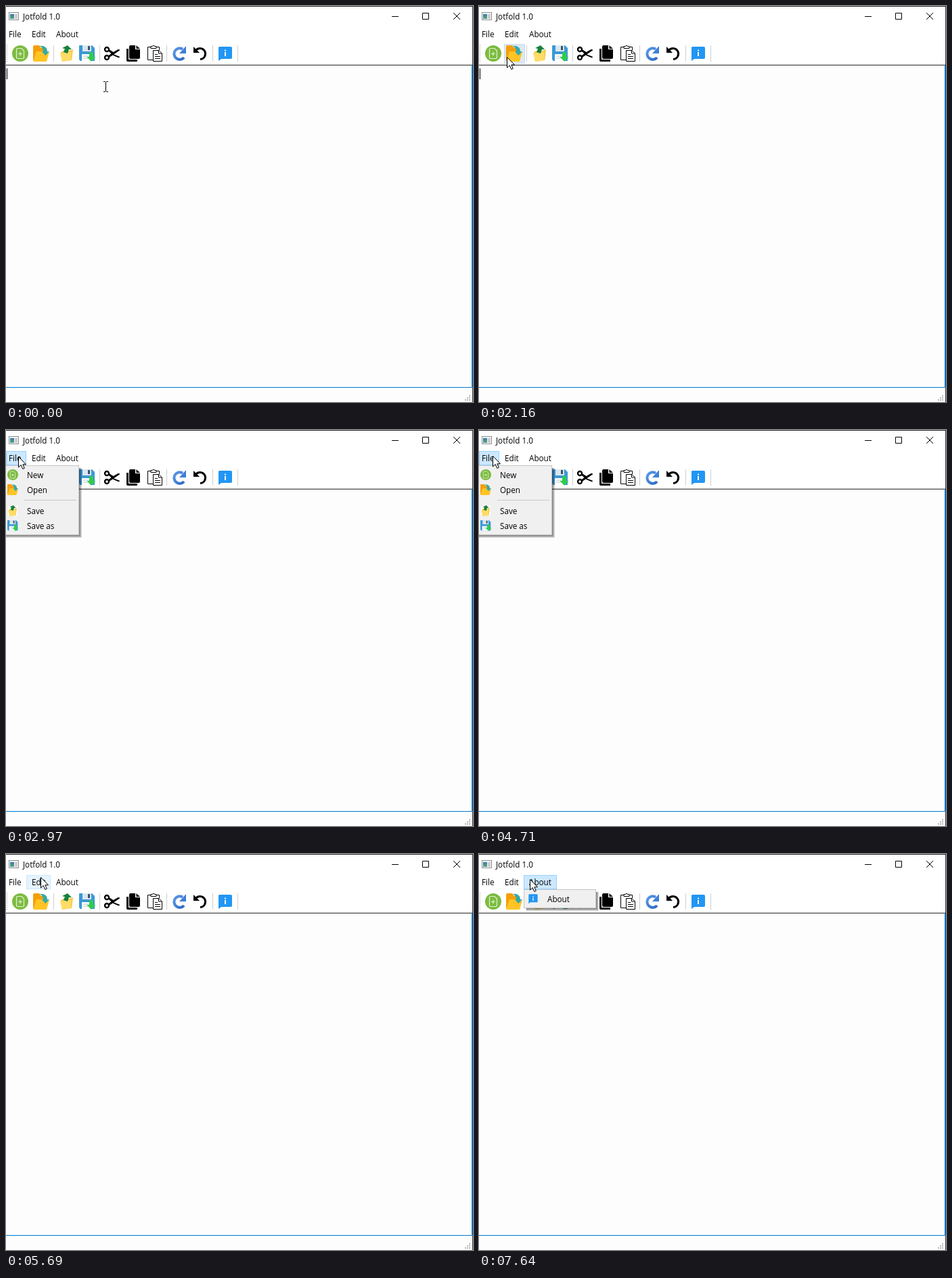
Recreate the animation shown at these times as an HTML page. Size 690 by 584 pixels, loop 8 s.

```html
<!DOCTYPE html>
<html lang="en">
<head>
<meta charset="utf-8">
<title>Text editor</title>
<style>
  html, body { margin: 0; width: 100%; height: 100%; overflow: hidden; background: #fff; }
  svg { display: block; }
  text { font: 11.7px "Open Sans", "Noto Sans", sans-serif; }
  .line { fill: none; stroke: #000; }
</style>
</head>
<body>
<svg id="stage" width="690" height="584" viewBox="0 0 690 584">
  <defs>
    <linearGradient id="pane" x2="0" y2="1"><stop stop-color="#3d78a8"/><stop offset="1" stop-color="#5aa886"/></linearGradient>
    <linearGradient id="blue" x2="1" y2="1"><stop stop-color="#5b9be8"/><stop offset="1" stop-color="#2b68c4"/></linearGradient>
    <symbol id="new" viewBox="0 0 24 24">
      <circle cx="12" cy="12" r="12" fill="#7cbb40"/>
      <path d="M8 4.5h6l3.5 3.5v10q0 1.5-1.5 1.5H8q-1.5 0-1.5-1.5V6Q6.500 4.500 8 4.500M12 9.500v6M9 12.500h6" fill="none" stroke="#e4f3d2" stroke-width="1.2"/>
    </symbol>
    <symbol id="open" viewBox="0 0 24 24">
      <path d="M0 2q0-2 2-2h7l3 4h8v18H0z" fill="#f59f0a"/>
      <path d="M10 1c6-1 11 2 11 8h3l-6 7-6-7h3c0-4-2-6-5-8z" fill="#35aaa6"/>
      <path d="M5 9h8l5 6 6-5-4 14H0z" fill="#ffc425"/>
    </symbol>
    <symbol id="save" viewBox="0 0 24 24">
      <path d="M3 10l5-2 2 2 11-4-2 16-14 2z" fill="#f2c53d"/>
      <path d="M2 12l17-3-1 13-13 2z" fill="#ffdc67"/>
      <path d="M13 0l6 6-4 0-2 6-6-2 2-5-4-1z" fill="#17803d"/>
    </symbol>
    <symbol id="saveAs" viewBox="0 0 24 24">
      <path d="M0 1q0-1 1-1h18l4 4v19H2l-2-2z" fill="#3c98d8"/>
      <path d="M5 0h13v9H5z" fill="#d9e6ee"/>
      <path d="M13 1h3v6h-3z" fill="#3a5368"/>
      <path d="M4 13h15v10H4z" fill="#fff"/>
      <path d="M6 16h9M6 19h7" stroke="#b9c8d0"/>
      <path d="M15 10h6v7h3.500l-6.500 7-6.500-7H15z" fill="#2fcc4b"/>
    </symbol>
    <symbol id="cut" viewBox="0 0 24 24">
      <g fill="none" stroke="#000" stroke-width="2.300"><circle cx="4.500" cy="6" r="3"/><circle cx="4.500" cy="18" r="3"/></g>
      <path d="M6 8l2-2 6 4 7-4q2-.5 3 1L8 18l-2-2 5-4zM14 13l10 4q-1 1.500-3 1l-9-4z"/>
    </symbol>
    <symbol id="copy" viewBox="0 0 24 24">
      <path d="M1 5h3v16h13v3H3q-2 0-2-2zM7 0h7v6h7v12q0 2-2 2H7q-2 0-2-2V2q0-2 2-2zM15.500 0L21 5h-5.500z"/>
    </symbol>
    <symbol id="paste" viewBox="0 0 24 24">
      <path class="line" d="M8 21.500H.5v-19H5M13 2.500h4.500V7M5 4.500v-3h2l2-1.200 2 1.200h2v3zM8.500 7.500H17l4.500 4.500v11.500h-13zM16.500 7.500V12H21M11 13.500h4M11 16.500h8M11 19.500h8"/>
    </symbol>
    <symbol id="redo" viewBox="0 0 24 24">
      <path d="M18 18A8.300 8.300 0 1 1 16 5.500" fill="none" stroke="url(#blue)" stroke-width="4"/>
      <path d="M21 1v11H11z" fill="#407fd8"/>
    </symbol>
    <symbol id="undo" viewBox="0 0 24 24">
      <path class="line" d="M4 8A8 8 0 1 1 11 20.500" stroke-width="3"/>
      <path d="M1 2v9h9z"/>
    </symbol>
    <symbol id="info" viewBox="0 0 24 24">
      <path d="M3 2h17q2 0 2 2v14q0 2-2 2H6l-4 3V4q0-2 1-2z" fill="#2196f3"/>
      <path d="M11 6.500h2v2h-2zM11 10h2v6h-2z" fill="#fff"/>
    </symbol>
  </defs>

  <rect width="690" height="584" fill="#fff"/>
  <rect y="88" width="690" height="496" fill="#fdfdfd"/>
  <rect y="86" width="690" height="1" fill="#b0b0b0"/>
  <rect y="87" width="690" height="1" fill="#646464"/>
  <rect width="690" height="1" fill="#2b2b2b"/>
  <rect x="689" width="1" height="584" fill="#333"/>
  <path d="M0 562.500H688.500V88" fill="none" stroke="#0078d7"/>
  <rect x="689" y="88" width="1" height="475" fill="#25659e"/>

  <rect x="4.500" y="9.500" width="14" height="11" fill="#f4f4f4" stroke="#8b9196"/>
  <rect x="6" y="12" width="6" height="7" fill="url(#pane)"/>
  <rect x="13" y="12" width="4" height="7" fill="#c9cdd0"/>
  <path class="line" d="M570 15.500h10M615.500 10.500h9v9h-9z"/>
  <path class="line" d="M661 10l10 10M671 10l-10 10"/>

  <rect id="hot"/>
  <text x="25" y="20">Jotfold 1.0</text>
  <text x="4" y="46">File</text>
  <text x="38" y="46">Edit</text>
  <text x="74" y="46">About</text>
  <path d="M1.500 57v27" stroke="#999" stroke-dasharray="1 2"/>
  <g id="bar"></g>
  <g id="menus"></g>
  <rect id="caret" x="1" y="92" width="1" height="16"/>
  <path id="beam" class="line" d="M-3.500-7.500h2.500l1 1 1-1h2.500M0-7V7M-3.500 7.500h2.500l1-1 1 1h2.500"/>
  <path id="arrow" d="M.5.500V16l3.700-3.500 2.600 6 2.500-1.200-2.500-5.500H11.500z" fill="#fff" stroke="#000"/>
</svg>
<script>
const LOOP = 8000;
const $ = id => document.getElementById(id);
const rect = (x, y, w, h, fill, more = "") =>
  `<rect x="${x}" y="${y}" width="${w}" height="${h}" fill="${fill}" ${more}/>`;
const icon = (id, x, y, size) =>
  `<use href="#${id}" x="${x}" y="${y}" width="${size}" height="${size}"/>`;

// Toolbar icons, separators and size grip
const tools = { new: 9, open: 40, save: 78, saveAs: 108, cut: 144.5, copy: 177,
  paste: 209, redo: 245, undo: 276, info: 312 };
let bar = "";
for (const id in tools) bar += icon(id, tools[id], 58, 24);
for (const x of [70, 138, 237, 305, 342]) bar += rect(x, 58, 1, 24, "#cfcfcf");
for (let row = 0; row < 3; row++)
  for (let col = 0; col <= row; col++)
    bar += rect(684 - 3 * col, 574 + 3 * row, 2, 2, "#b8b8b8");
$("bar").innerHTML = bar;

// Each menu: left edge, width, items as [label, icon, white backing]; null is a separator
const menus = [
  [-4, 112, [["New", "new"], ["Open", "open"], null, ["Save", "save", 1], ["Save as", "saveAs", 1]]],
  [30, 103, [["Cut", "cut"], ["Copy", "copy"], ["Paste", "paste"], null, ["Redo", "redo", 1], ["Undo", "undo", 1]]],
  [66, 107, [["About", "info"]]]
];
function menuMarkup([x, w, items]) {
  let y = 55, body = "", shadow = "";
  for (const item of items) {
    if (!item) {
      body += rect(x + 31, y + 4, w - 35, 1, "#c8c8c8");
      y += 9;
      continue;
    }
    const [label, id, backed] = item;
    if (backed) body += rect(x + 7, y + 4, 14, 14, "#fff");
    body += icon(id, x + 6, y + 3, 16) + `<text x="${x + 35}" y="${y + 16}">${label}</text>`;
    y += 22;
  }
  const h = y + 3 - 52;
  for (let i = 1; i < 5; i++) shadow += rect(x + 4, 56, w - 4 + i, h - 4 + i, "#000", 'opacity=".14"');
  return `<g>${shadow}${rect(x + .5, 52.5, w - 1, h - 1, "#f0f0f0", 'stroke="#c6c6c6"')}${body}</g>`;
}
$("menus").innerHTML = menus.map(menuMarkup).join("");

// Pointer moves: first step, last step, number of steps, x, y
const moves = [
  [500, 740, 4, 53, 119], [1550, 1730, 3, 47, 100],
  [2040, 2160, 3, 41, 75], [2220, 2580, 7, 18, 39],
  [4710, 4710, 1, 20, 38], [4770, 4890, 3, 51, 34],
  [7270, 7270, 1, 72, 36], [7580, 7640, 2, 75, 37]
];
// Open menus: index, open, close, fade time, fade steps
const opened = [[0, 2820, 4830, 150, 4], [1, 4830, 5190, 180, 4],
  [1, 5800, 7270, 160, 4], [2, 7270, LOOP, 60, 2]];
const caretOn = [[0, 500], [990, 1550], [2040, 2580], [5190, 5690]];
// Hover areas: x, y, width, height
const areas = [[0, 31, 30, 21], [30, 31, 36, 21], [66, 31, 49, 21], [6, 56, 31, 29], [37, 56, 31, 29]];

const stepAt = (t, start, span, n) =>
  n < 2 ? 0 : Math.min(n - 1, Math.floor((t - start) * (n - 1) / span + 1e-6));

function pointer(t) {
  let x = 147, y = 119;
  for (const [start, end, n, toX, toY] of moves) {
    if (t < start) break;
    const part = (stepAt(t, start, end - start, n) + 1) / n;
    x += (toX - x) * part;
    y += (toY - y) * part;
  }
  return [Math.round(x), Math.round(y)];
}

const show = (el, on) => el.setAttribute("visibility", on ? "visible" : "hidden");

function draw(t) {
  const [x, y] = pointer(t);
  const inText = y > 87;
  show($("beam"), inText);
  show($("arrow"), !inText);
  $("beam").setAttribute("transform", `translate(${x + .5} ${y})`);
  $("arrow").setAttribute("transform", `translate(${x} ${y})`);
  show($("caret"), caretOn.some(([a, b]) => t >= a && t < b));

  const open = opened.find(([, a, b]) => t >= a && t < b);
  [...$("menus").children].forEach((el, i) => {
    const on = open && open[0] === i;
    show(el, on);
    if (on) {
      const [, start, , fade, n] = open;
      el.setAttribute("opacity", (stepAt(t, start, fade, n) + .45) / (n - .55));
    }
  });

  const over = areas.findIndex(([ax, ay, w, h]) => x >= ax && x < ax + w && y >= ay && y < ay + h);
  const lit = open ? open[0] : over;
  show($("hot"), lit >= 0);
  if (lit < 0) return;
  const [ax, ay, w, h] = areas[lit];
  const [fill, stroke] = open ? ["#cce8ff", "#99d1ff"] : lit > 2 ? ["#dde8f2", "#cbdeee"] : ["#e5f3ff", "#cce8ff"];
  const look = { x: ax + .5, y: ay + .5, width: w - 1, height: h - 1, fill, stroke };
  for (const key in look) $("hot").setAttribute(key, look[key]);
}

function tick() {
  draw(performance.now() % LOOP);
  requestAnimationFrame(tick);
}
tick();
</script>
</body>
</html>
```
